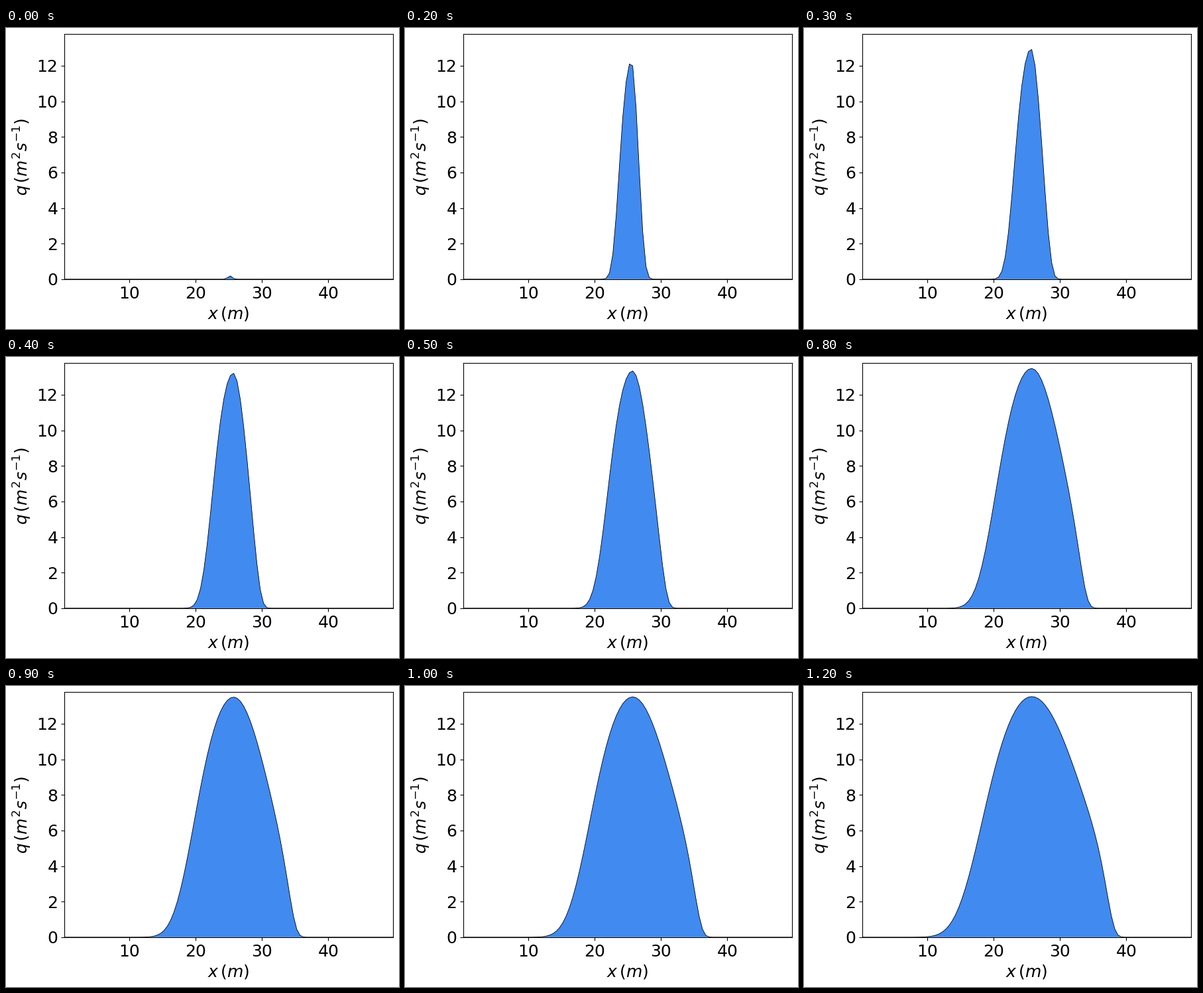
Recreate the animation shown at these times as a matplotlib script. Size 593 px wide and 454 px high, loop 1.3 s.

```python
import numpy as np
import matplotlib.pyplot as plt
from matplotlib.animation import FuncAnimation

W, H, DPI = 593, 454, 100
FRAMES, INTERVAL = 13, 100

plt.rcParams.update({"font.family": "DejaVu Sans", "font.size": 18})

x = np.arange(0.25, 50, 0.5)


def flank(d, core, edge, steepness):
    """Bell-shaped core cut off by a steeper edge."""
    return np.exp(-(d / core) ** 2 - (d / edge) ** steepness)


def discharge(t):
    """Discharge wave spreading from a dam that breaks at mid-channel."""
    t = max(t, 0.08)
    peak = 13.57 * t ** 2 / (t ** 2 + 0.43)
    crest = 25.75 - 1.3 / (t ** 2 + 2)
    d = np.abs(x - crest)

    # The upstream side keeps its shape; the downstream front sharpens.
    spread = (t + 0.15) ** 0.8
    upstream = flank(d, 1.386 * spread, 1.514 * spread, 4)
    downstream = flank(d, np.hypot(0.631 * t ** 1.14, 0.5),
                       np.hypot(0.98 * t, 1.5), 3.3 + 0.8 * t)
    return peak * np.where(x < crest, upstream, downstream)


fig = plt.figure(figsize=(W / DPI, H / DPI), dpi=DPI, facecolor="white")
ax = fig.add_axes([88.1 / W, 75.2 / H, 496 / W, 369.6 / H])
ax.set_xlim(x[0], x[-1])
ax.set_ylim(0, 13.78)
ax.set_xticks(range(10, 50, 10))
ax.set_yticks(range(0, 14, 2))
ax.set_xlabel(r"$x\,(m)$")
ax.set_ylabel(r"$q\,(m^2s^{-1})$")

water, = ax.fill(x, 0 * x, facecolor="#418af0", edgecolor="none")
surface, = ax.plot([], [], color="black", lw=0.6)


def update(i):
    q = discharge(i)
    water.set_xy(np.c_[np.r_[x[0], x, x[-1]], np.r_[0, q, 0]])
    surface.set_data(x, q)
    return water, surface


anim = FuncAnimation(fig, update, frames=FRAMES, interval=INTERVAL,
                     repeat=True, repeat_delay=0, blit=False)
plt.show()
```
